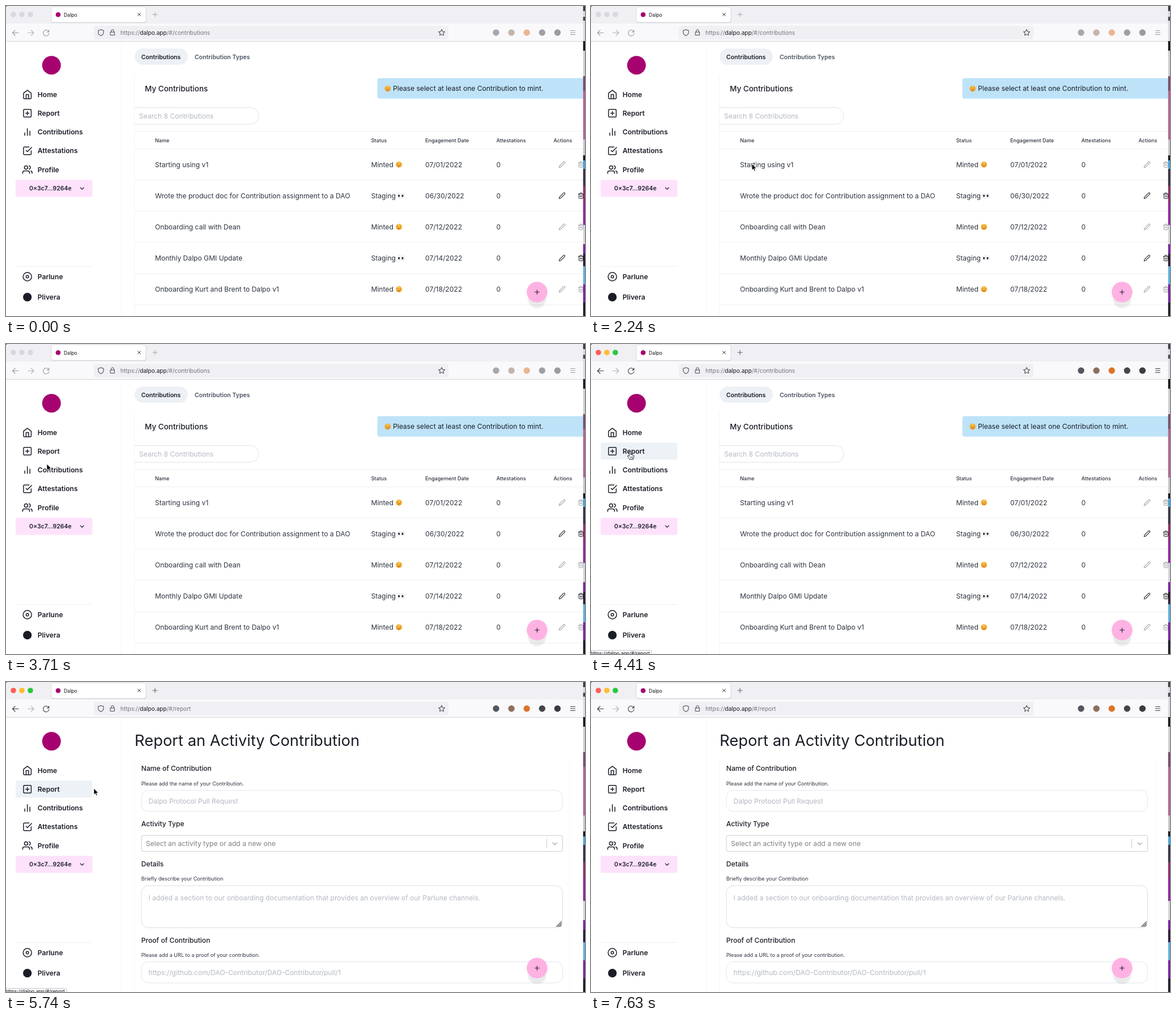
Animation of 1022 by 548 pixels, one loop 8.33 s. Source, as an HTML page:

```html
<!DOCTYPE html>
<html lang="en">
<head>
<meta charset="utf-8">
<title>Report a contribution</title>
<style>
  html, body { margin: 0; width: 100%; height: 100%; overflow: hidden; background: #fff; }
  svg { display: block; }
  text { font-family: Inter, "Open Sans", sans-serif; white-space: pre; }
</style>
</head>
<body>
<svg id="stage" width="1022" height="548" viewBox="0 0 1022 548"></svg>
<script>
const LOOP = 8330, STEP = 70;
const INK = '#1a1d27', SOFT = '#2d333f', LINE = '#edf0f4', HINT = '#b3b8c0', CHROME = '#5b5b66';
const BODY = 12.1, SMALL = 9.08, TAB = 10.55;

// Drawing helpers
const text = (x, y, s, size = BODY, weight = 400, fill = INK) =>
  `<text x="${x}" y="${y}" font-size="${size}" font-weight="${weight}" fill="${fill}">${s}</text>`;
const rect = (x, y, w, h, fill, r = 0, stroke = 'none') =>
  `<rect x="${x}" y="${y}" width="${w}" height="${h}" rx="${r}" fill="${fill}" stroke="${stroke}"/>`;
const dot = (x, y, r, fill) => `<circle cx="${x}" cy="${y}" r="${r}" fill="${fill}"/>`;
const oval = (x, y, rx, ry, fill, stroke = 'none') =>
  `<ellipse cx="${x}" cy="${y}" rx="${rx}" ry="${ry}" fill="${fill}" stroke="${stroke}" stroke-width=".6"/>`;
const path = (d, stroke = INK, width = 1, more = '') =>
  `<path d="${d}" fill="none" stroke="${stroke}" stroke-width="${width}" stroke-linecap="round" stroke-linejoin="round" ${more}/>`;
const icon = (d, cx, cy, size, stroke = INK) => {
  const k = size / 24;
  return path(d, stroke, 2, `transform="translate(${cx - size / 2} ${cy - size / 2}) scale(${k})"`);
};
const group = (id, body) => `<g id="${id}">${body}</g>`;

const ICONS = {
  home: 'M3 9l9-7 9 7v11a2 2 0 0 1-2 2H5a2 2 0 0 1-2-2zM9 22V12h6v10',
  plus: 'M5 3h14a2 2 0 0 1 2 2v14a2 2 0 0 1-2 2H5a2 2 0 0 1-2-2V5a2 2 0 0 1 2-2zM12 8v8M8 12h8',
  bars: 'M18 20V10M12 20V4M6 20v-6',
  check: 'M9 11l3 3L22 4M21 12v7a2 2 0 0 1-2 2H5a2 2 0 0 1-2-2V5a2 2 0 0 1 2-2h11',
  users: 'M17 21v-2a4 4 0 0 0-4-4H5a4 4 0 0 0-4 4v2M5 7a4 4 0 1 0 8 0a4 4 0 1 0-8 0M23 21v-2a4 4 0 0 0-3-3.87M16 3.13a4 4 0 0 1 0 7.75',
  disc: 'M2 12a10 10 0 1 0 20 0a10 10 0 1 0-20 0M9 12a3 3 0 1 0 6 0a3 3 0 1 0-6 0',
  pencil: 'M17 3a2.83 2.83 0 1 1 4 4L7.5 20.5 2 22l1.5-5.5z',
  trash: 'M3 6h18M19 6v14a2 2 0 0 1-2 2H7a2 2 0 0 1-2-2V6m3 0V4a2 2 0 0 1 2-2h4a2 2 0 0 1 2 2v2M10 11v6M14 11v6',
  star: 'M12 2l3.1 6.3 6.9 1-5 4.9 1.2 6.8L12 17.8 5.8 21 7 14.2 2 9.3l6.9-1z',
  shield: 'M12 2l9 3v6c0 6-4 9.5-9 11.5C7 20.5 3 17 3 11V5z',
  lock: 'M5 11h14v11H5zM7.5 11V7a4.5 4.5 0 0 1 9 0v4',
  reload: 'M21 3v6h-6M20.5 9A9.5 9.5 0 1 0 21 14'
};

const smile = (x, y) => dot(x, y, 5.4, 'url(#gold)') + dot(x - 1.9, y - 1, .7, '#6b3d10') +
  dot(x + 1.9, y - 1, .7, '#6b3d10') + path(`M${x - 1.3} ${y + 2.3}h2.6`, '#b8701f', 1.5);
const eyes = (x, y) => [0, 6.4].map(dx =>
  oval(x + dx, y, 2.7, 4.5, '#fafafa', '#cfcfd3') + oval(x + dx - .7, y + .3, 1.5, 2.1, '#222')).join('');

function browser() {
  const lights = (fills) => fills.map((c, i) => dot(13 + i * 15, 15, 4.8, c)).join('');
  const buttons = path('M263 11v8M259 15h8', CHROME) +
    path('M22 47.5H11.5M16 43l-4.5 4.5 4.5 4.5', '#3a3a44', 1.2) +
    icon(ICONS.reload, 71, 47.5, 13, '#3a3a44') +
    ['#55555f', '#8d6f5c', '#dc7328', '#45454e', '#3a3a44'].map((c, i) => dot(865 + i * 27.1, 47, 5.7, c)).join('') +
    path('M996.5 43.5h8M996.5 47h8M996.5 50.5h8', '#3a3a44');
  return rect(0, 0, 1022, 31, '#f0f0f4') + rect(0, 31, 1022, 31.5, '#f9f9fb') + rect(0, 62, 1022, 1, '#d5d5da') +
    group('idleLights', lights(Array(3).fill('#d9d9dd'))) +
    group('liveLights', lights(['#ff5f57', '#febc2e', '#28c840'])) +
    rect(80, 2, 167.5, 28, '#c9c9d0', 4) + rect(80, 1.3, 167, 27.7, '#fff', 4, '#dcdce2') +
    dot(92, 15.3, 4.3, '#a6026f') + text(102, 18.7, 'Dalpo', 8.7, 400, '#15141a') +
    path('M232.5 12.5l5 5M237.5 12.5l-5 5', '#3a3a44') +
    group('buttons', buttons) + path('M38.5 47.5H49M44.5 43l4.5 4.5-4.5 4.5', '#b4b4bb', 1.2) +
    rect(155, 35, 626, 24, '#f0f0f4', 4) + icon(ICONS.shield, 167.5, 47, 12.5, '#45454e') +
    icon(ICONS.lock, 188, 46.5, 12, '#45454e') + icon(ICONS.star, 769, 47, 13, '#45454e') +
    `<text x="202" y="51" font-size="10.1" fill="#73737d">https://<tspan fill="#15141a">dalpo.app</tspan>/#/<tspan id="route"></tspan></text>`;
}

function sidebar() {
  const items = [['home', 'Home'], ['plus', 'Report'], ['bars', 'Contributions'], ['check', 'Attestations'], ['users', 'Profile']];
  return rect(203, 63, 1, 485, '#f5f6f8') + dot(80.3, 104.7, 16.5, '#a6026f') +
    group('hover', rect(17, 174.3, 135.5, 30.2, '#edf2f7', 3)) +
    items.map(([name, label], i) => {
      const y = 156.4 + i * 33.2;
      return icon(ICONS[name], 37.7, y, 18) + text(55.8, y + 4.4, label, BODY, 600);
    }).join('') +
    rect(17, 307.3, 135.5, 30.2, '#fee2fb', 3) + text(41, 326.2, '0×3c7...9264e', 10.5, 600) +
    path('M131.3 321l3 3 3-3', INK, 1.1) + rect(17, 460, 135.5, 1, LINE) +
    icon(ICONS.disc, 37.7, 478.5, 18) + text(55.8, 483, 'Parlune', BODY, 600) +
    dot(37.7, 514.7, 7.6, INK) + text(55.8, 519.2, 'Plivera', BODY, 600);
}

function listPage() {
  const rows = [
    ['Starting using v1', '07/01/2022', true],
    ['Wrote the product doc for Contribution assignment to a DAO', '06/30/2022', false],
    ['Onboarding call with Dean', '07/12/2022', true],
    ['Monthly Dalpo GMI Update', '07/14/2022', false],
    ['Onboarding Kurt and Brent to Dalpo v1', '07/18/2022', true]
  ];
  const heads = [[263, 'Name'], [644.5, 'Status'], [740, 'Engagement Date'], [865.5, 'Attestations'], [966.5, 'Actions']];
  return rect(227, 75.3, 94, 28.5, '#edf0f5', 14.2) + text(238.8, 93.8, 'Contributions', TAB, 600) +
    text(333, 93.8, 'Contribution Types', TAB, 600, '#4a5260') +
    rect(226, 122, 1, 426, '#f3f4f6') + text(245, 150.8, 'My Contributions', 13.5, 500) +
    rect(655.5, 127.5, 380, 36.3, '#bee3f8', 4) + smile(673.7, 146) +
    text(683, 150.3, 'Please select at least one Contribution to mint.') +
    path('M226.5 179.5H432a14 14 0 0 1 14 14v1.5a14 14 0 0 1-14 14H226.5', '#dde2ea') +
    text(235, 198.6, 'Search 8 Contributions', BODY, 400, HINT) +
    rect(226, 221, 800, 1, LINE) + rect(226, 252, 800, 1, LINE) +
    heads.map(([x, s]) => text(x, 240.6, s, SMALL, 500, SOFT)).join('') +
    rows.map(([name, date, minted], i) => {
      const y = 280.2 + i * 55.1, tone = minted ? '#9a9da3' : INK;
      const cell = (x, s) => text(x, y + 4.4, s, BODY, 400, SOFT);
      return cell(263, name) + cell(644.5, minted ? 'Minted' : 'Staging') +
        (minted ? smile(693.6, y) : eyes(694.3, y)) + cell(740, date) + cell(865.5, '0') +
        icon(ICONS.pencil, 981.5, y, 12.5, tone) + icon(ICONS.trash, 1014.8, y, 12, tone) +
        rect(226, Math.round(y + 27), 800, 1, LINE);
    }).join('');
}

function formPage() {
  const label = (y, s) => text(238.8, y, s, BODY, 500);
  const hint = (y, s) => text(238.8, y, s, SMALL, 400, SOFT);
  const field = (y, h, s, dy, stroke = '#e2e6ec') =>
    rect(239, y, 743.5, h, '#fff', 12, stroke) + text(251.5, y + dy, s, BODY, 400, HINT);
  return text(227, 112.6, 'Report an Activity Contribution', 27.35) +
    rect(226, 135, 1, 413, '#f5f6f8') + rect(995, 135, 1, 413, '#f7f8f9') +
    label(157, 'Name of Contribution') + hint(182.6, 'Please add the name of your Contribution.') +
    field(191.3, 37.5, 'Dalpo Protocol Pull Request', 23.2) +
    label(254.6, 'Activity Type') + rect(239, 271.3, 743.5, 28.2, '#fff', 3, '#ccc') +
    text(247, 290, 'Select an activity type or add a new one', BODY, 400, '#808080') +
    rect(954, 277.5, 1, 16, '#ccc') + path('M965 284l3.6 3.6 3.6-3.6', '#b5b5b5', 1.5) +
    label(325.6, 'Details') + hint(351, 'Briefly describe your Contribution') +
    field(360, 74.3, 'I added a section to our onboarding documentation that provides an overview of our Parlune channels.', 25.8, '#d9dde3') +
    group('grip', path('M971.5 432.5l9-9M974.5 432.5l6-6M977.5 432.5l3-3', '#555', 1.1)) +
    label(460.6, 'Proof of Contribution') + hint(486, 'Please add a URL to a proof of your contribution.') +
    field(494.5, 37.5, 'https://github.com/DAO-Contributor/DAO-Contributor/pull/1', 23.2);
}

// Sliver of desktop beside the window: [top, colour], each running to the next
const EDGE = [[0, '#3c3946'], [9, '#d9d6e2'], [19, '#494552'], [26, '#dcd9e4'], [62, '#17161c'], [79, '#d0ced6'],
  [124, '#7a4a68'], [150, '#b5648e'], [236, '#c9c5ce'], [264, '#16151b'], [273, '#48a6de'], [288, '#35303f'],
  [318, '#8a2b66'], [346, '#8e22a0'], [387, '#d6d4da'], [421, '#7b1fa2'], [438, '#2b1836'], [460, '#5fb2e2'],
  [492, '#7b1fa2'], [524, '#1d1a24'], [548, '']];
const desktop = () => EDGE.slice(0, -1).map(([y, c], i) => rect(1018.7, y, 4, EDGE[i + 1][0] - y, c)).join('');

const fab = () => `<circle cx="937.5" cy="518" r="16" fill="#000" opacity=".08" filter="url(#soft)"/>` +
  dot(937.4, 505.7, 18.3, '#feb2e3') + path('M937.4 502v7.6M933.6 505.8h7.6', '#2a1a2a', 1.1);

const arrow = '<path d="M0 0V11.3l2.6-2.4 1.7 3.9 1.9-.8-1.7-3.8H8z" fill="#000" stroke="#fff" stroke-width=".8"/>';
const hand = '<path d="M-1.2 8V1.2a1.25 1.25 0 0 1 2.5 0V5c.8-.8 2-.5 2.1.4.9-.6 2-.2 2.1.7 1-.4 1.8.2 1.8 1.2 0 2.5-.7 3.6-1.3 4.800V13.5H-.4C-1 11.5-2.6 10.3-3.7 8.2c-.6-1.3 1-2 1.8-.8z" fill="#fff" stroke="#000" stroke-width=".9"/>' +
  path('M1.5 8.5v2.8M3.3 8.5v2.8M5 8.5v2.8', '#000', .6);

document.getElementById('stage').innerHTML =
  `<defs><radialGradient id="gold" cy=".35"><stop offset="0" stop-color="#ffd454"/><stop offset="1" stop-color="#f0a02c"/></radialGradient>
   <filter id="soft"><feGaussianBlur stdDeviation="1.3"/></filter></defs>` +
  rect(0, 0, 1022, 548, '#fff') + browser() + sidebar() + group('list', listPage()) + group('form', formPage()) + fab() +
  group('scroll', rect(1012, 64, 5.5, 315, '#7c7c81', 2.7)) +
  group('status', rect(-4, 541.5, 111, 12, '#f9f9fb', 2, '#c8c8ce') + text(-1, 549.9, 'https://dalpo.app/#/report', 8.5, 400, '#15141a')) +
  desktop() + '<path d="M0 0h2L0 2z" fill="#555"/>' +
  group('cursor', group('arrow', arrow) + group('hand', hand));

const $ = Object.fromEntries([...document.querySelectorAll('[id]')].map(el => [el.id, el]));

// Pointer keys: [ms, x, y]
const MOVES = [[1330, 1030, 330], [1960, 430, 306], [2030, 430, 306], [2240, 284, 279], [2730, 262, 296], [2870, 262, 296],
  [3710, 72, 212], [4130, 68.5, 190.5], [5320, 68.5, 190.5], [5740, 155, 188], [6160, 560, 330], [6510, 1030, 400]];

function pointer(t) {
  const i = MOVES.findIndex(([ms]) => ms > t);
  if (i < 1) return null;
  const [t0, x0, y0] = MOVES[i - 1], [t1, x1, y1] = MOVES[i];
  const p = (t - t0) / (t1 - t0), e = p * p * (3 - 2 * p);
  return [x0 + (x1 - x0) * e, y0 + (y1 - y0) * e];
}

const within = (t, a, b) => t >= a && t < b;
const fade = (t, from, gone) => Math.min(1, Math.max(0, (gone - t) / (gone - from)));
const show = (el, on) => el.setAttribute('opacity', Number(on));

function render(ms) {
  const t = Math.floor(ms / STEP) * STEP;
  const focused = t >= 4200, form = t >= 4620;
  show($.idleLights, !focused);
  show($.liveLights, focused);
  show($.buttons, focused ? 1 : .5);
  show($.list, !form);
  show($.form, form);
  show($.grip, t >= 5040);
  $.route.textContent = form ? 'report' : 'contributions';
  show($.hover, within(t, 4200, 4620) || within(t, 5390, 5810));
  show($.scroll, form ? fade(t, 4970, 5110) : 0);
  show($.status, t < 4200 ? 0 : t < 5390 ? fade(t, 4800, 4940) : fade(t, 5880, 6020));

  const at = pointer(t), link = within(t, 4130, 5740);
  show($.cursor, at !== null);
  if (at) $.cursor.setAttribute('transform', `translate(${at[0]} ${at[1]})`);
  show($.arrow, !link);
  show($.hand, link);
}

const start = performance.now();
function tick() {
  render((performance.now() - start) % LOOP);
  requestAnimationFrame(tick);
}
tick();
</script>
</body>
</html>
```
